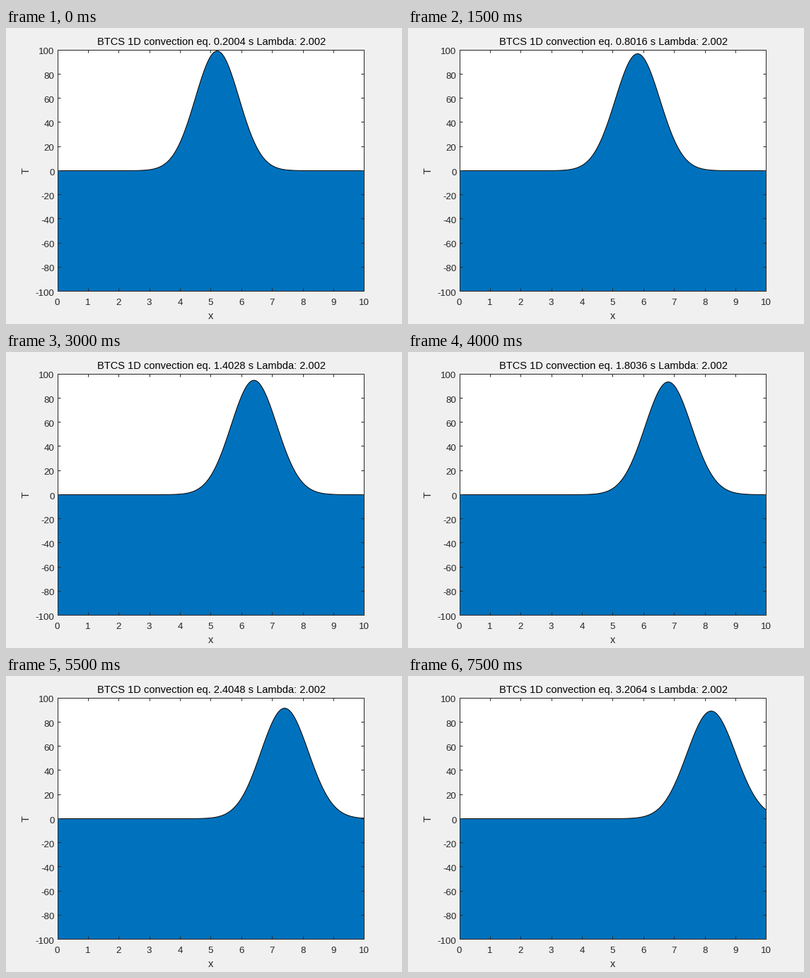
Animation of 560x420 px, one loop 8000 ms. Source, as a matplotlib script:

```python
import numpy as np
import matplotlib.pyplot as plt
from matplotlib.animation import FuncAnimation
from matplotlib.transforms import Affine2D

W, H, DPI = 560, 420, 100
FRAMES, INTERVAL = 16, 500
PX = 72 / DPI  # points per pixel
LEFT, RIGHT, BOTTOM, TOP = 72.55, 506.45, 46.9, 389.2
GREY = "#262626"

plt.rcParams["font.family"] = "Liberation Sans"

# Backward-time central-space scheme for u_t + u_x = 0
DT, LAMBDA, STEPS = 0.04008, 2.002, 5
x = np.arange(0, 12.5, DT / LAMBDA)


def solve():
    n = len(x)
    system = np.eye(n) + LAMBDA / 2 * (np.eye(n, k=1) - np.eye(n, k=-1))
    advance = np.linalg.matrix_power(np.linalg.inv(system), STEPS)
    u = 100 * np.exp(-(x - 5) ** 2)
    history = []
    for _ in range(FRAMES):
        u = advance @ u
        history.append(u)
    return history


waves = solve()

fig = plt.figure(figsize=(W / DPI, H / DPI), dpi=DPI, facecolor="#f0f0f0")
ax = fig.add_axes([LEFT / W, BOTTOM / H, (RIGHT - LEFT) / W, (TOP - BOTTOM) / H])
ax.set(xlim=(0, 10), ylim=(-100, 100),
       xticks=range(11), yticks=range(-100, 101, 20))
ax.set_axisbelow(False)
ax.tick_params(direction="in", length=4.4 * PX, width=PX, color=GREY,
               top=True, right=True, labelbottom=False, labelleft=False)
for spine in ax.spines.values():
    spine.set(linewidth=PX, color=GREY)


def label(px, py, text, size, ha="center", color=GREY, rotation=0):
    """Text with its baseline at a pixel position measured from the top left."""
    return fig.text(px / W, 1 - py / H, text, fontsize=size * PX, color=color,
                    ha=ha, va="baseline", rotation=rotation,
                    rotation_mode="anchor")


TICK_SIZE, LABEL_SIZE = 13.33, 14.67
for v in range(11):
    label(LEFT + v * (RIGHT - LEFT) / 10, 393, str(v), TICK_SIZE)
for v in range(-100, 101, 20):
    y = H - BOTTOM - (v + 100) * (TOP - BOTTOM) / 200
    label(68.4, y + 6.6, str(v), TICK_SIZE, ha="right")
label(290, 413, "x", LABEL_SIZE)
label(33, 202.5, "T", LABEL_SIZE, rotation=90)
title = label(290.5, 24, "", LABEL_SIZE, color="black")

# Axis lines snap to pixels; the curve sits on pixel centres
to_centre = Affine2D().translate(0.5, -0.5)
area, = ax.fill([0, 10, 10], [0, 0, -100], facecolor="#0072bd",
                edgecolor="black", linewidth=PX, zorder=1,
                transform=ax.transData + to_centre)


def update(i):
    area.set_xy(np.column_stack([np.r_[x, x[-1], 0],
                                 np.r_[waves[i], -100, -100]]))
    t = (i + 1) * STEPS * DT
    title.set_text(f"BTCS 1D convection eq. {t:.5g} s Lambda: {LAMBDA}")
    return area, title


anim = FuncAnimation(fig, update, frames=FRAMES, interval=INTERVAL,
                     repeat=True, repeat_delay=0)
plt.show()
```
